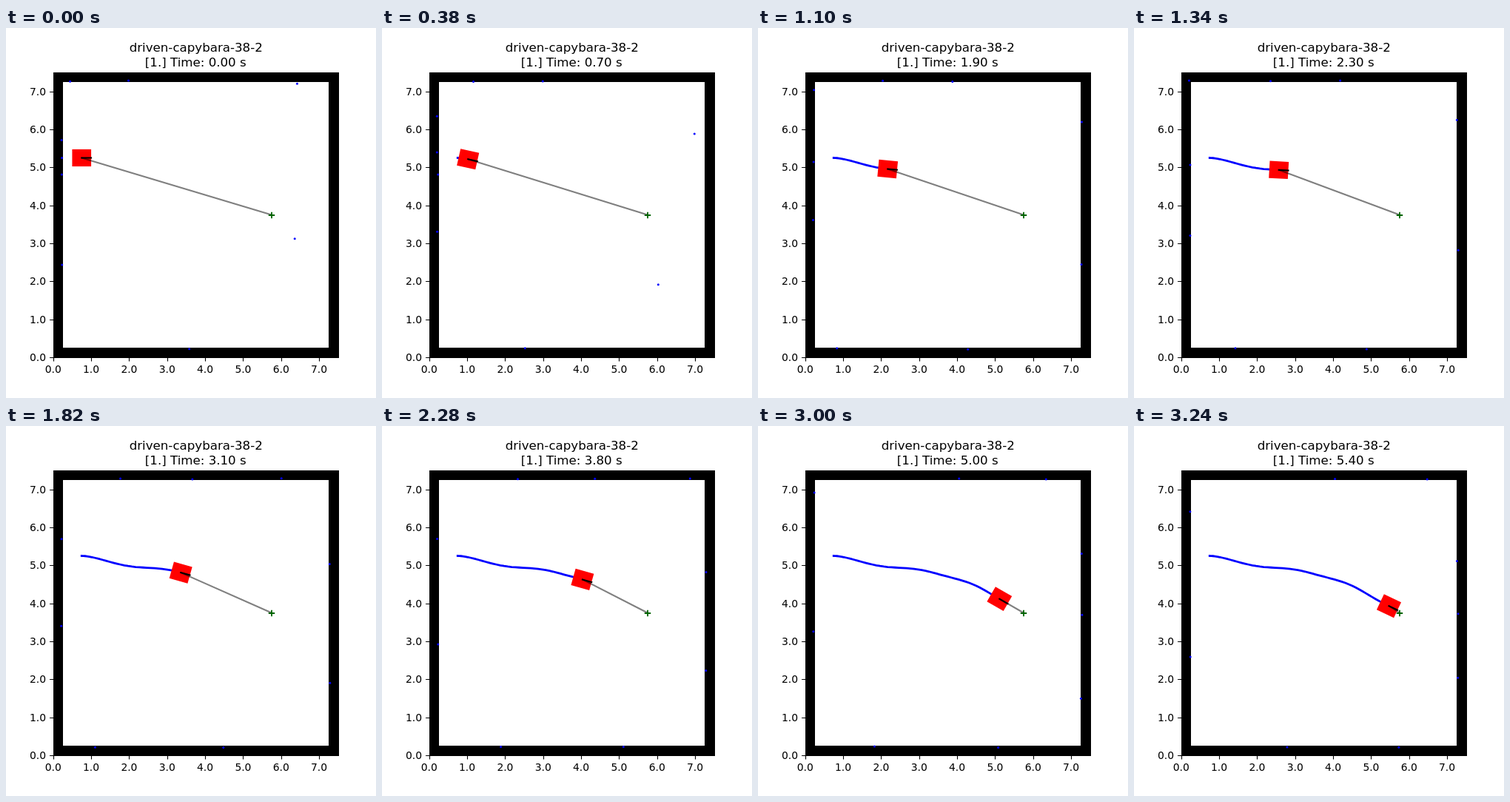
These frames come from a looping animation (500x500 px, 3340 ms). An HTML page:

```html
<!DOCTYPE html>
<html lang="en">
<head>
<meta charset="utf-8">
<title>Robot run</title>
<style>
  html, body { margin: 0; width: 100%; height: 100%; overflow: hidden; background: #fff; }
  svg { display: block; width: 100vw; height: 100vh; }
  text { font: 13.89px "DejaVu Sans", sans-serif; }
  .title { font-size: 16.67px; text-anchor: middle; }
</style>
</head>
<body>
<svg id="stage" viewBox="0 0 500 500"></svg>
<script>
const SCALE = 385 / 7.5;
const LOOP = 3340, LAST = 54;
const GOAL = [5.75, 3.75];
const WALL = [0.25, 7.25];
const MAX_RANGE = 6, RAY_GAP = 39.8, ACCEL = 1.12;

// Heading in degrees at simulated seconds
const TURNS = [
  [0, 0], [0.35, -4], [0.7, -12.6], [1.05, -16], [1.5, -13], [2, -3.5], [2.3, -3.3],
  [2.7, -8], [3.1, -15.7], [3.5, -14.5], [3.9, -16], [4.5, -29.6], [4.9, -31], [5.4, -25.4]
];

const px = x => 63.75 + SCALE * x;
const py = y => 445 - SCALE * y;
const rad = deg => deg * Math.PI / 180;
const stage = document.getElementById('stage');

function add(tag, attrs, parent = stage) {
  const el = document.createElementNS('http://www.w3.org/2000/svg', tag);
  for (const key in attrs) el.setAttribute(key, attrs[key]);
  return parent.appendChild(el);
}

function label(x, y, content, attrs) {
  const el = add('text', { x, y, ...attrs });
  el.textContent = content;
  return el;
}

function heading(t) {
  const i = Math.max(1, TURNS.findIndex(k => k[0] >= t - 1e-9));
  const [t0, a] = TURNS[i - 1], [t1, b] = TURNS[i];
  return a + (b - a) * (t - t0) / (t1 - t0);
}

// Accelerate to 1 m/s and follow the heading
function drive() {
  const poses = [], sub = 20, dt = 0.1 / sub;
  let x = 0.75, y = 5.25;
  for (let n = 0; n <= LAST; n++) {
    poses.push({ x, y, h: heading(n / 10) });
    if (n === LAST) break;
    for (let i = 0; i < sub; i++) {
      const t = n / 10 + (i + 0.5) * dt;
      const step = Math.min(1, ACCEL * t) * dt, a = rad(heading(t));
      x += step * Math.cos(a);
      y += step * Math.sin(a);
    }
  }
  return poses;
}

function noise(n, k) {
  const v = Math.sin(n * 12.9898 + k * 78.233 + 4.1) * 43758.5453;
  return v - Math.floor(v);
}

function rayEnd(pose, n, k) {
  const a = rad(pose.h + 180 + k * RAY_GAP);
  const dx = Math.cos(a), dy = Math.sin(a);
  const over = 0.005 + 0.04 * noise(n, k);
  const reach = (p, d) => ((d > 0 ? WALL[1] + over : WALL[0] - over) - p) / d;
  const r = Math.min(MAX_RANGE, reach(pose.x, dx), reach(pose.y, dy));
  return [px(pose.x + r * dx), py(pose.y + r * dy)];
}

// Axes and walls
add('rect', { x: 64, y: 60, width: 386, height: 386 });
add('rect', { x: 77, y: 73, width: 359, height: 359, fill: '#fff' });
for (let i = 0; i <= 7; i++) {
  const x = Math.round(px(i)) + 0.5, y = Math.round(py(i)) + 0.5;
  add('path', { d: `M${x} 445V450.4M64 ${y}H59`, stroke: '#000', 'stroke-width': 1.11 });
  label(px(i), 466, i + '.0', { 'text-anchor': 'middle' });
  label(54, Math.round(py(i) + 5), i + '.0', { 'text-anchor': 'end' });
}
label(256.75, 32, 'driven-capybara-38-2', { class: 'title' });
const clock = label(256.25, 52, '', { class: 'title' });

// Moving parts
const trail = add('path', {
  fill: 'none', stroke: '#00f', 'stroke-width': 2.78,
  'stroke-linecap': 'square', 'stroke-linejoin': 'round'
});
const body = add('rect', {
  x: -0.25 * SCALE, y: -0.225 * SCALE, width: 0.5 * SCALE, height: 0.45 * SCALE, fill: '#f00'
});
const aim = add('path', { stroke: '#000', 'stroke-opacity': 0.5, 'stroke-width': 2.08 });
const nose = add('path', {
  d: `M0 0H${0.25 * SCALE}`, stroke: '#000', 'stroke-width': 2.08, 'stroke-linecap': 'square'
});
const dots = Array.from({ length: 9 }, () => add('circle', { r: 1.5, fill: '#00f' }));
add('path', { d: 'M354.8 253H363.2M359 248.8V257.2', stroke: '#006400', 'stroke-width': 1.8 });

const poses = drive();
const points = poses.map(p => `${px(p.x).toFixed(2)} ${py(p.y).toFixed(2)}`);

function draw(n) {
  const pose = poses[n];
  const place = `translate(${points[n]}) rotate(${-pose.h})`;
  clock.textContent = `[1.] Time: ${(n / 10).toFixed(2)} s`;
  trail.setAttribute('d', n ? 'M' + points.slice(0, n + 1).join('L') : '');
  body.setAttribute('transform', place);
  nose.setAttribute('transform', place);
  aim.setAttribute('d', `M${points[n]}L${px(GOAL[0])} ${py(GOAL[1])}`);
  dots.forEach((dot, k) => {
    const [x, y] = rayEnd(pose, n, k);
    dot.setAttribute('cx', x);
    dot.setAttribute('cy', y);
  });
}

// Steps alternate between 20 ms and 100 ms
function stepAt(ms) {
  return Math.min(LAST, 2 * Math.floor(ms / 120) + (ms % 120 >= 20 ? 1 : 0));
}

let shown = -1;
const start = performance.now();
function tick() {
  const n = stepAt((performance.now() - start) % LOOP);
  if (n !== shown) draw(shown = n);
  requestAnimationFrame(tick);
}
tick();
</script>
</body>
</html>
```
